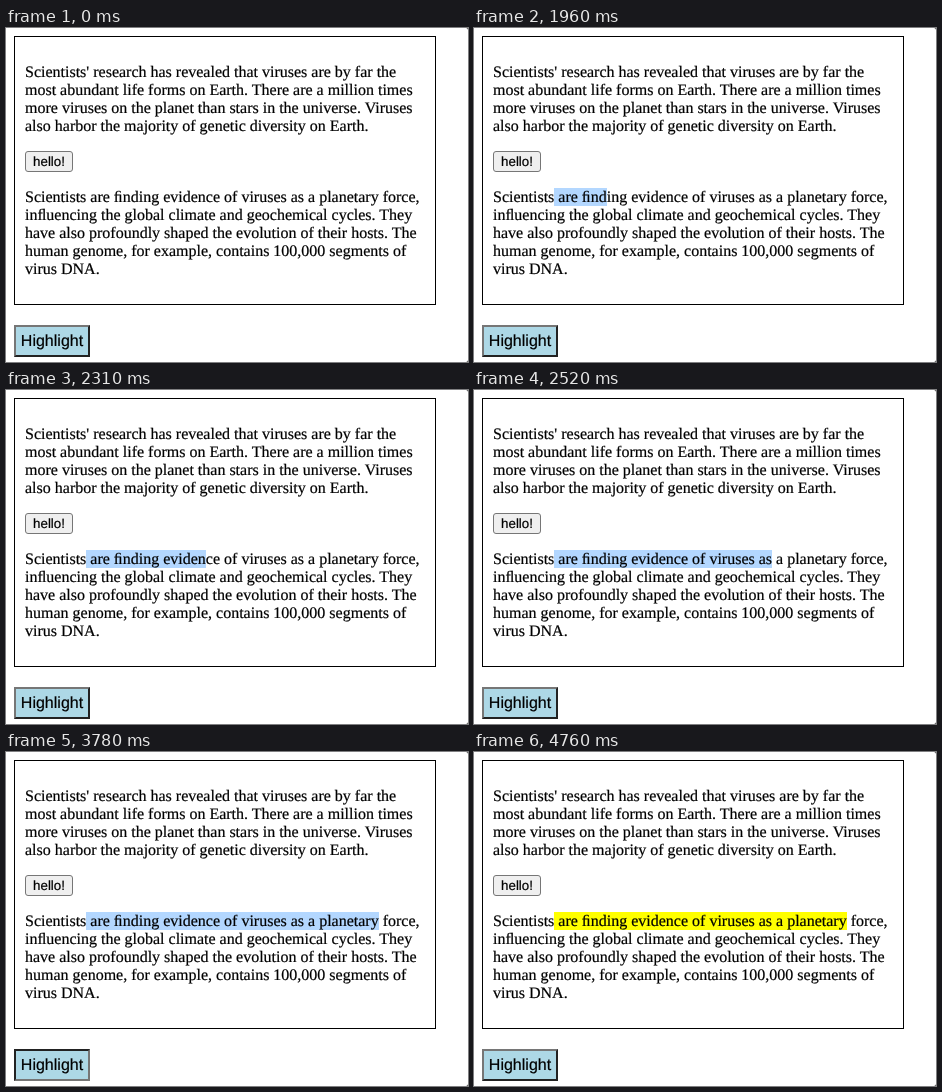
Write an HTML page that moves like this. It is 462 by 334 pixels and loops after 5.74 s.

```html
<!DOCTYPE html>
<html lang="en">
<head>
<meta charset="utf-8">
<title>Highlight</title>
<style>
  html, body { margin: 0; width: 100%; height: 100%; overflow: hidden; background: #222; }
  #page {
    position: relative; width: 462px; height: 334px; background: #fff;
    border-radius: 0 2px 2px 0; color: #000;
    font: 16px/18px "Liberation Serif", Times, serif;
    text-rendering: geometricPrecision; -webkit-text-stroke: .2px #000;
  }
  #box { position: absolute; left: 8px; top: 8px; width: 420px; height: 267px; border: 1px solid #000; }
  p { position: absolute; left: 10px; margin: 0; padding-top: 1px; white-space: pre; isolation: isolate; }
  #mark { position: absolute; top: 0; height: 18px; z-index: -1; }
  .button {
    position: absolute; box-sizing: border-box; text-align: center; white-space: nowrap;
    font-family: "Liberation Sans", Arial, sans-serif;
  }
  #hello {
    left: 10px; top: 114px; width: 48px; height: 21px; font-size: 13.333px; line-height: 19px;
    background: #efefef; border: 1px solid #767676; border-radius: 3px;
  }
  #highlight {
    left: 8px; top: 297px; width: 76px; height: 32px; line-height: 30px;
    background: #add8e6; border: 2px solid; border-color: #767676 #222 #222 #767676;
  }
  #highlight.down { border-color: #222 #767676 #767676 #222; }
</style>
</head>
<body>
<div id="page">
  <div id="box">
    <p style="top:26px">Scientists' research has revealed that viruses are by far the
most abundant life forms on Earth. There are a million times
more viruses on the planet than stars in the universe. Viruses
also harbor the majority of genetic diversity on Earth.</p>
    <div id="hello" class="button">hello!</div>
    <!-- &#xFB01; and &#xFB02; are the fi and fl ligatures -->
    <p id="para" style="top:151px">Scientists are &#xFB01;nding evidence of viruses as a planetary force,
in&#xFB02;uencing the global climate and geochemical cycles. They
have also profoundly shaped the evolution of their hosts. The
human genome, for example, contains 100,000 segments of
virus DNA.<span id="mark"></span></p>
  </div>
  <div id="highlight" class="button">Highlight</div>
</div>
<script>
const LOOP = 5740, TICK = 70, START = 'Scientists'.length;
const $ = id => document.getElementById(id);
const para = $('para'), mark = $('mark'), button = $('highlight');

// Drag progress: [time, selected characters]
const drag = [[1960, 8], [2310, 18], [2520, 34], [2800, 46]];

function selected(t) {
  if (t < drag[0][0]) return 0;
  t = Math.floor(t / TICK) * TICK;
  for (let i = 1; i < drag.length; i++) {
    const [t0, n0] = drag[i - 1], [t1, n1] = drag[i];
    if (t < t1) return Math.round(n0 + (n1 - n0) * (t - t0) / (t1 - t0));
  }
  return drag[drag.length - 1][1];
}

function draw(t) {
  const count = selected(t);
  mark.style.display = count ? 'block' : 'none';
  if (count) {
    const range = document.createRange();
    range.setStart(para.firstChild, START);
    range.setEnd(para.firstChild, START + count);
    const r = range.getBoundingClientRect();
    const left = Math.round(r.left), right = Math.round(r.right);
    mark.style.left = left - para.getBoundingClientRect().left + 'px';
    mark.style.width = right - left + 'px';
  }
  mark.style.background = t < 3920 ? '#b3d7ff' : t < 4760 ? '#b4d6a8' : '#ff0';
  button.classList.toggle('down', t >= 3780 && t < 3920);
}

const begin = performance.now();
function frame() {
  draw((performance.now() - begin) % LOOP);
  requestAnimationFrame(frame);
}
frame();
</script>
</body>
</html>
```
